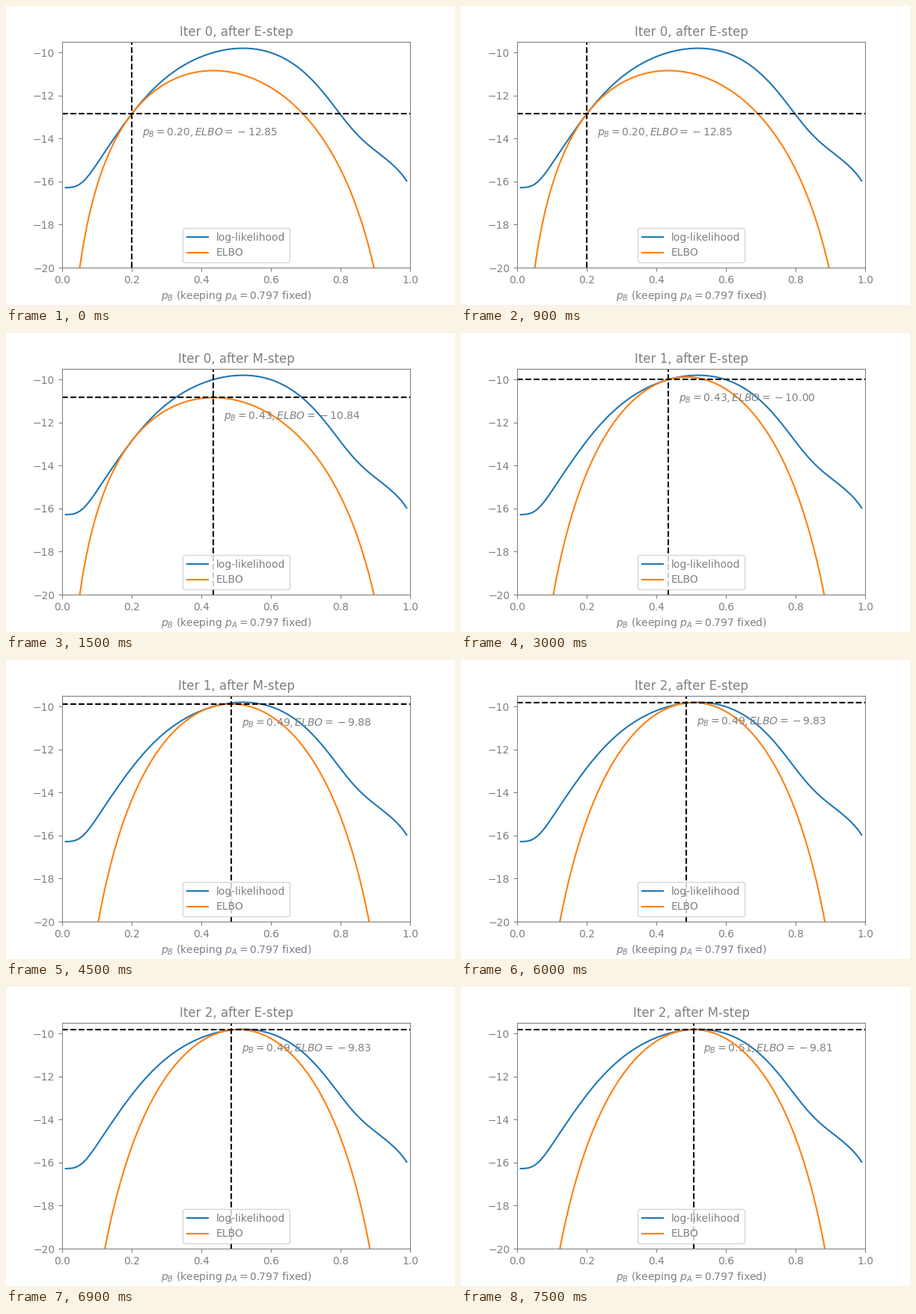
These frames come from a looping animation (600x400 px, 9000 ms). A matplotlib script:

```python
import numpy as np
import matplotlib.pyplot as plt
from math import comb
from matplotlib.animation import FuncAnimation

HEADS = np.array([5, 9, 8, 4, 7])
TOSSES = 10
P_A = 0.79679
COEFS = np.array([comb(TOSSES, int(h)) for h in HEADS])


def joint(p):
    """Probability of each toss set together with a coin of bias p."""
    p = np.asarray(p)[..., None]
    return 0.5 * COEFS * p**HEADS * (1 - p)**(TOSSES - HEADS)


def log_likelihood(p_b):
    return np.log(joint(P_A) + joint(p_b)).sum(-1)


def e_step(p_b):
    b = joint(p_b)
    return b / (joint(P_A) + b)


def m_step(q):
    return (q * HEADS).sum() / (q.sum() * TOSSES)


def elbo(p_b, q):
    part_a = (1 - q) * np.log(joint(P_A) / (1 - q))
    part_b = q * np.log(joint(p_b) / q)
    return (part_a + part_b).sum(-1)


def run_em(p_b, iters):
    steps = []
    for i in range(iters):
        q = e_step(p_b)
        steps.append((f"Iter {i}, after E-step", p_b, q))
        p_b = m_step(q)
        steps.append((f"Iter {i}, after M-step", p_b, q))
    return steps


STEPS = run_em(0.2, 3)
grid = np.linspace(0.01, 0.99, 99)

plt.rcParams.update({
    "text.color": "gray",
    "axes.labelcolor": "gray",
    "axes.edgecolor": "gray",
    "xtick.color": "gray",
    "ytick.color": "gray",
})
fig, ax = plt.subplots(figsize=(6, 4), dpi=100)
fig.subplots_adjust(left=0.125, right=0.9, bottom=0.125, top=0.88)


def draw(n):
    title, p_b, q = STEPS[n]
    bound = elbo(p_b, q)
    ax.clear()
    ax.plot(grid, log_likelihood(grid), label="log-likelihood")
    ax.plot(grid, elbo(grid, q), label="ELBO")
    ax.axvline(p_b, color="black", ls="--")
    ax.axhline(bound, color="black", ls="--")
    ax.text(p_b + 0.03, bound - 1, f"$p_B={p_b:.2f}, ELBO={bound:.2f}$")
    ax.set(xlim=(0, 1), ylim=(-20, -9.5), title=title,
           xlabel="$p_B$ (keeping $p_A=0.797$ fixed)")
    ax.legend(loc="lower center")


anim = FuncAnimation(fig, draw, frames=len(STEPS), init_func=lambda: draw(0),
                     interval=1500, repeat=True, repeat_delay=0)
plt.show()
```
